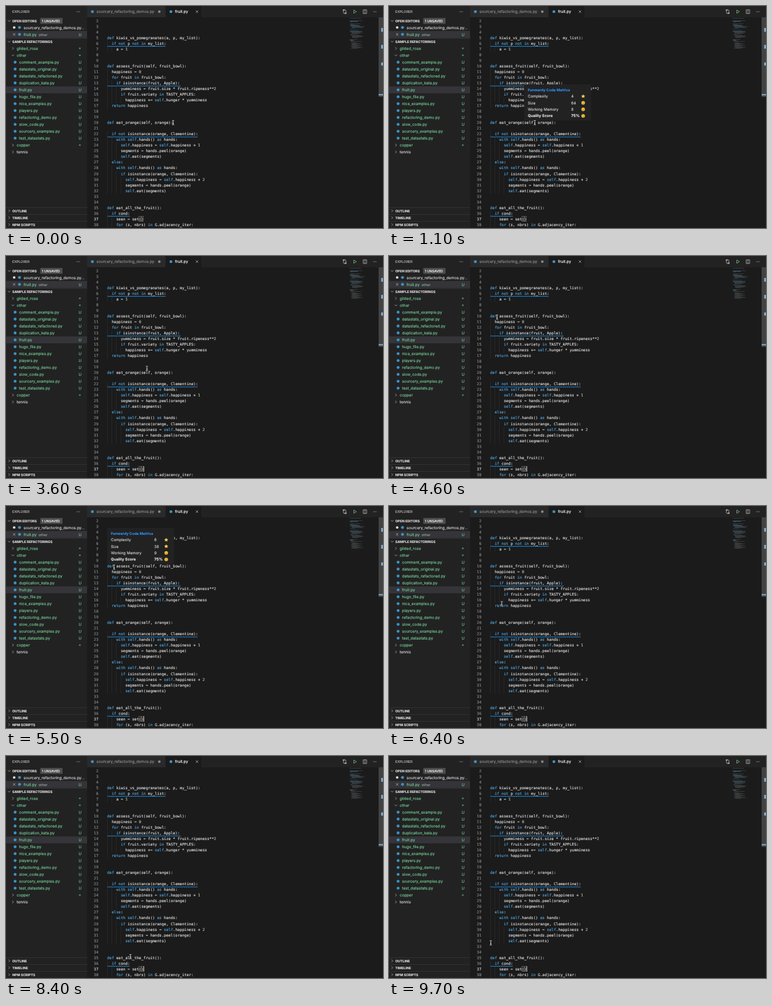
An HTML page that plays this animation: 600 by 354 pixels, repeating every 9900 ms.

```html
<!DOCTYPE html>
<html lang="en">
<head>
<meta charset="utf-8">
<title>Code metrics on hover</title>
<style>
  html, body { margin: 0; width: 100%; height: 100%; overflow: hidden; background: #1b1b1b; }
  svg { display: block; width: 100vw; height: 100vh; }
  text, tspan { fill: currentColor; stroke: currentColor; stroke-width: .14; }
  text { font: 6.2px Inter, "Open Sans", sans-serif; color: #d0d0d0; text-rendering: geometricPrecision; white-space: pre; }
  .code { font: 6px "DejaVu Sans Mono", monospace; color: #dcdcdc; }
  .num { color: #8c8c8c; text-anchor: end; }
  .head { font-size: 5.3px; font-weight: 700; color: #dcdcdc; }
  .line { fill: none; stroke: #c5c5c5; stroke-width: .7; }

  #mouse { animation: mouse 9.9s linear infinite; }
  #tip1 { animation: tip1 9.9s linear infinite; }
  #tip2 { animation: tip2 9.9s linear infinite; }
  @keyframes mouse {
    0%, 1% { transform: translate(266px, 186px); animation-timing-function: ease-in-out; }
    6%, 23.2% { transform: translate(232px, 186px); }
    27.2%, 34.3% { transform: translate(230.5px, 189px); animation-timing-function: ease-in-out; }
    43.4%, 59.6% { transform: translate(172px, 97.5px); animation-timing-function: ease-in-out; }
    73.7% { transform: translate(199.5px, 314.5px); }
    78.8%, 89.9% { transform: translate(198px, 320px); animation-timing-function: ease-in-out; }
    96%, 100% { transform: translate(162px, 298px); }
  }
  @keyframes tip1 {
    0%, 8.5% { opacity: 0; }
    10%, 35.3% { opacity: 1; }
    35.4%, 100% { opacity: 0; }
  }
  @keyframes tip2 {
    0%, 49% { opacity: 0; }
    50.5%, 60.5% { opacity: 1; }
    60.6%, 100% { opacity: 0; }
  }
</style>
</head>
<body>
<svg id="stage" viewBox="0 0 600 354" preserveAspectRatio="none"></svg>
<script>
const LOOP = 9900, LEFT = 161, CHAR = 3.612, SIDE = 129;
const EDITOR = '#1b1b1b', PANEL = '#222223', SELECTED = '#343439';
const GREEN = '#73c991', BLUE = '#4fa3dc', ICON = '#3f93c4', WAVE = '#1f8fe4';
const FIRST = 2, CURRENT = 37, WARNED = [6, 13, 22, 36];
const code = `


def kiwis_vs_pomegranates(a, p, my_list):
  if not p not in my_list:
    a = 1


def assess_fruit(self, fruit_bowl):
  happiness = 0
  for fruit in fruit_bowl:
    if isinstance(fruit, Apple):
      yumminess = fruit.size * fruit.ripeness**2
      if fruit.variety in TASTY_APPLES:
        happiness += self.hunger * yumminess
  return happiness


def eat_orange(self, orange):

  if not isinstance(orange, Clementine):
    with self.hands() as hands:
      self.happiness = self.happiness + 1
      segments = hands.peel(orange)
      self.eat(segments)
  else:
    with self.hands() as hands:
      if isinstance(orange, Clementine):
        self.happiness = self.happiness + 2
        segments = hands.peel(orange)
        self.eat(segments)


def eat_all_the_fruit():
  if cond:
    seen = set()
    for (s, nbrs) in G.adjacency_iter:`.split('\n');

const rowY = n => 23.5 + 9.03 * (n - FIRST);
const colX = c => LEFT + c * CHAR;
const rect = (x, y, w, h, fill, extra = '') =>
  `<rect x="${x}" y="${y}" width="${w}" height="${h}" fill="${fill}" ${extra}/>`;
const dot = (x, y, r, fill) => `<circle cx="${x}" cy="${y}" r="${r}" fill="${fill}"/>`;
const fileIcon = (x, y) => dot(x, y, 2.3, ICON);
const path = (d, extra = '') => `<path class="line" d="${d}" ${extra}/>`;
// y is the middle of the text line
const text = (x, y, str, attrs = '') => `<text x="${x}" y="${y + 2.2}" ${attrs}>${str}</text>`;
const tint = color => `style="color:${color}"`;
const chevron = (x, y, open) =>
  path(open ? `M${x - 2} ${y - 1}l2 2l2 -2` : `M${x - 1} ${y - 2}l2 2l-2 2`);
const cross = (x, y) => path(`M${x - 1.8} ${y - 1.8}l3.6 3.6m0 -3.6l-3.6 3.6`);
const ellipsis = (x, y) => [-2, 0, 2].map(d => dot(x + d, y, .55, '#c5c5c5')).join('');

function highlight(line) {
  return line.replace(
    /\b(def|if|not|in|for|return|with|as|else)\b|\bself(?=\.)|\b\d+\b/g,
    word => `<tspan ${tint(/\d/.test(word) ? '#b5cea8' : BLUE)}>${word}</tspan>`);
}

function squiggle(y, width) {
  const waves = 'l1.5 -.9l1.5 .9'.repeat(Math.round(width / 3));
  return path(`M${LEFT} ${y}${waves}`, `style="stroke:${WAVE};stroke-width:1"`);
}

function sidebar() {
  const files = ['comment_example', 'datastats_original', 'datastats_refactored', 'duplication_kata',
    'fruit', 'hugo_file', 'nice_examples', 'players', 'refactoring_demo', 'slow_code',
    'sourcery_examples', 'test_datastats'];
  const folder = (y, name, open, color) => chevron(11, y, open) + text(17, y, name, tint(color)) +
    (color === GREEN ? dot(117.5, y, 1.4, '#4c8a62') : '');
  let out = rect(0, 0, SIDE, 354, PANEL) + rect(0, 39.8, SIDE, 11, SELECTED) +
    rect(0, 128.2, SIDE, 11, SELECTED);
  out += text(10, 9, 'EXPLORER', 'style="font-size:5.4px;color:#bbb"') + ellipsis(115, 9);

  out += chevron(5, 23.7, true) + text(10, 23.7, 'OPEN EDITORS', 'class="head"');
  out += rect(54.5, 19, 35.5, 9.4, '#4d4d4d', 'rx="1"') + text(57, 23.7, '1 UNSAVED', 'style="font-size:5.3px;color:#fff"');
  out += dot(13, 34.3, 2, '#ddd') + fileIcon(21.5, 34.3) + text(28, 34.3, 'sourcery_refactoring_demos.py...');
  out += cross(13, 45.3) + fileIcon(21.5, 45.3) + text(28, 45.3, 'fruit.py', tint(GREEN)) +
    text(52, 45.3, 'other', 'style="font-size:5.6px;color:#8f9f96"') + text(115.5, 45.3, 'U', tint(GREEN));

  out += chevron(5, 56.7, true) + text(10, 56.7, 'SAMPLE REFACTORINGS', 'class="head"');
  out += folder(67.6, 'gilded_rose', false, GREEN) + folder(78.6, 'other', true, GREEN);
  files.forEach((name, i) => {
    const y = 89.6 + 11.02 * i;
    out += fileIcon(14.5, y) + text(20.7, y, name + '.py', tint(GREEN)) + text(115.5, y, 'U', tint(GREEN));
  });
  out += folder(221.8, 'copper', false, GREEN) + folder(232.8, 'tennis', false, '#d0d0d0');

  ['OUTLINE', 'TIMELINE', 'NPM SCRIPTS'].forEach((name, i) => {
    const y = 326.6 + 11 * i;
    out += rect(0, y - 5.5, SIDE, .5, '#404041') + chevron(5, y, false) + text(10, y, name, 'class="head"');
  });
  return out + rect(0, 51.3, SIDE, .5, '#404041');
}

function compareIcon(x, y) {
  return path(`M${x - 2} ${y - 1.4}v2.9q0 1.2 1.2 1.2h1.6m-1 -1.2l1.2 1.2l-1.2 1.2` +
    `M${x + 2} ${y + 1.4}v-2.9q0 -1.2 -1.2 -1.2h-1.6m1 -1.2l-1.2 1.2l1.2 1.2`) +
    dot(x - 2, y - 2.4, 1.1, '#c5c5c5') + dot(x + 2, y + 2.4, 1.1, '#c5c5c5');
}

function tabs() {
  return rect(SIDE, 0, 600 - SIDE, 18, PANEL) + rect(SIDE, 0, 124.5, 18, '#2a2a2b') + rect(254, 0, 57, 18, EDITOR) +
    fileIcon(137.5, 9) + text(144, 9, 'sourcery_refactoring_demos.py', tint('#8c8c8c')) + dot(244, 9, 2, '#8c8c8c') +
    fileIcon(262.5, 9) + text(269, 9, 'fruit.py', tint('#fff')) + cross(304, 9) + compareIcon(539, 9) +
    path('M553.5 6.4l4.2 2.6l-4.2 2.6z', 'style="stroke:#89d185"') +
    path('M568.5 6h5.5v6h-5.5zM571.2 6v6') + ellipsis(587, 9);
}

function editor() {
  let out = '';
  code.forEach((line, i) => {
    const n = i + FIRST, y = rowY(n), indent = line.search(/\S|$/);
    out += text(147, y, n, `class="code num" ${n === CURRENT ? tint('#d0d0d0') : ''}`);
    for (let c = 0; c < indent; c += 2) out += rect(colX(c), y - 4.5, .5, 9.03, '#353535');
    out += text(colX(indent), y, highlight(line.trim()), 'class="code"');
    if (WARNED.includes(n)) out += squiggle(y + 5.2, line.length * CHAR);
  });
  for (const c of [14, 15])
    out += rect(colX(c), rowY(CURRENT) - 4, CHAR, 8, 'none', 'stroke="#888" stroke-width=".5"');
  return out + rect(colX(16), rowY(CURRENT) - 4.3, 1, 8.6, '#c4c4c4', 'id="caret"');
}

function minimap() {
  let out = '';
  const bar = (y, indent, length, color = '#b8c4cc', opacity = .28) => {
    out += rect(547 + indent * .5, y, length * .5, .6, color, `opacity="${opacity}"`);
  };
  bar(19, 0, 36);
  code.forEach((line, i) => {
    const indent = line.search(/\S|$/), y = 20 + i;
    bar(y, indent, line.length - indent);
    if (WARNED.includes(i + FIRST)) bar(y + .5, 0, line.length, WAVE, .7);
  });
  for (let i = 0; i < 10; i++) bar(58 + i, 4 + i % 3 * 2, 16 + i * 7 % 19);
  return out;
}

function scrollbar() {
  const marks = [[35, 6], [62, 6], [90, 5]].map(([y, h]) => rect(597, y, 3, h, '#7fa6c4'));
  return rect(593, 18, 7, 127, '#424242') + marks.join('') + rect(593, 140.5, 7, 2, '#8aa9c2');
}

function star(x, y) {
  const points = Array.from({ length: 10 }, (_, i) => {
    const a = i * Math.PI / 5, r = i % 2 ? 1.6 : 3.3;
    return `${x + r * Math.sin(a)},${y - r * Math.cos(a)}`;
  });
  return `<polygon points="${points.join(' ')}" fill="#ffd34d"/>`;
}

function face(x, y) {
  return dot(x, y, 2.8, '#fcc536') + dot(x - 1, y - .7, .4, '#6b4312') + dot(x + 1, y - .7, .4, '#6b4312') +
    path(`M${x - 1.3} ${y + .8}q1.3 1.2 2.6 0`, 'style="stroke:#6b4312;stroke-width:.5"');
}

function tooltip(id, x, y, values, icons) {
  const labels = ['Complexity', 'Size', 'Working Memory', 'Quality Score'];
  let out = rect(x, y, 106.5, 57.8, PANEL) +
    text(x + 6, y + 8.5, 'Fenwardy Code Metrics', 'style="color:#2f8fee;font-weight:700;font-size:5.8px"');
  labels.forEach((label, i) => {
    const rowAt = y + 19 + 10.4 * i;
    const style = `style="font-size:6px;${i === 3 ? 'font-weight:700;color:#e4e4e4' : ''}"`;
    out += text(x + 6, rowAt, label, style) + text(x + 75, rowAt, values[i], style) + icons[i](x + 94, rowAt);
  });
  return `<g id="${id}" opacity="0">${out}</g>`;
}

const beam = 'M-1.6 -3.6q1.6 0 1.6 1v5.2q0 1 -1.6 1M1.6 -3.6q-1.6 0 -1.6 1M0 2.6q0 1 1.6 1M-1 1h2';
const mouse = `<g id="mouse">${path(beam, 'style="stroke:#111;stroke-width:1.8"')}${path(beam, 'style="stroke:#fff;stroke-width:.8"')}</g>`;

document.getElementById('stage').innerHTML =
  rect(0, 0, 600, 354, EDITOR) + editor() + minimap() + scrollbar() + tabs() + sidebar() +
  tooltip('tip1', 215, 125, [4, 64, 8, '75%'], [star, face, face, face]) +
  tooltip('tip2', 161, 35, [6, 38, 9, '75%'], [star, star, face, face]) +
  mouse;

// The caret is lit from 400 to 900 ms of every second.
const blink = [{ offset: 0, opacity: 0 }];
for (let t = 400; t < LOOP; t += 1000)
  blink.push({ offset: t / LOOP, opacity: 1 }, { offset: (t + 500) / LOOP, opacity: 0 });
document.getElementById('caret').animate(
  blink.map(step => ({ ...step, easing: 'step-end' })), { duration: LOOP, iterations: Infinity });
</script>
</body>
</html>
```
